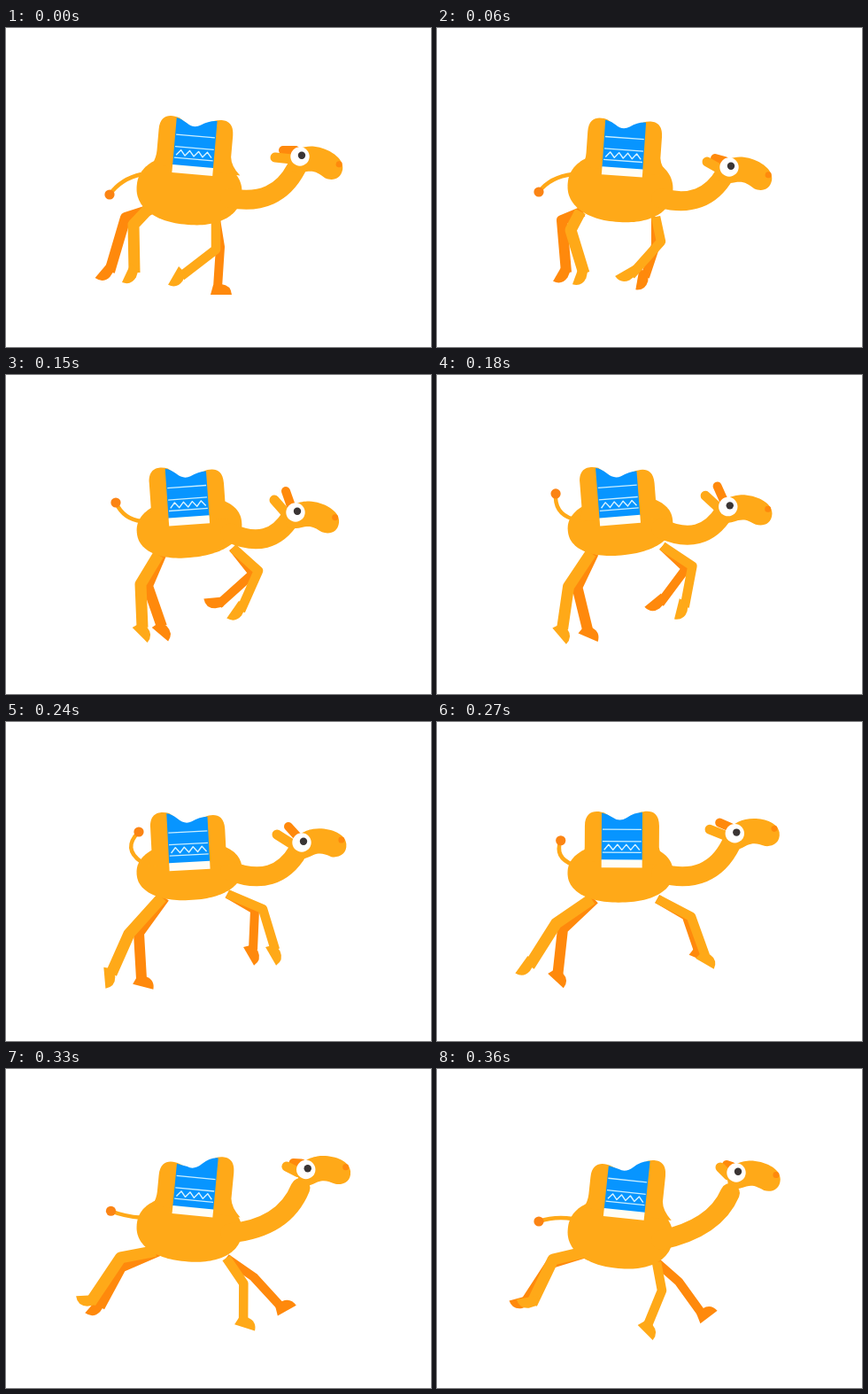
Animation of 480x360 px, one loop 420 ms. Source, as an HTML page with a canvas:

```html
<!DOCTYPE html>
<html>
<head>
<meta charset="utf-8">
<title>Running camel</title>
<style>
html, body { margin: 0; height: 100%; overflow: hidden; background: #fff; }
canvas { display: block; }
</style>
</head>
<body>
<canvas id="stage" width="480" height="360"></canvas>
<script>
const ctx = document.getElementById('stage').getContext('2d');
const LIGHT = '#ffa918', DARK = '#ff890c', BLUE = '#0795ff';
const LOOP = 420, STEP = 30, CYCLE = 390;
const KEYS = [0, 60, 90, 150, 240, 300, 360];

// Each track has one row per key time.
// Legs: knee x, y, ankle x, y, sole angle
const rearNear = [
  [144, 222, 145, 276, 115], [151, 228, 166, 277, 110], [151, 226, 186, 276, 90], [152, 236, 154, 285, 45],
  [139, 239, 119, 284, 85], [131, 215, 94, 266, 165], [131, 215, 107, 265, 170]];
const rearFar = [
  [135, 214, 117, 275, 130], [141, 217, 146, 276, 120], [152, 226, 181, 274, 105], [160, 238, 176, 284, 40],
  [150, 238, 153, 290, 15], [134, 228, 119, 275, 85], [129, 219, 99, 265, 165]];
const frontNear = [
  [237, 250, 198, 280, 120], [253, 241, 219, 279, 150], [269, 236, 240, 273, 165], [285, 221, 265, 266, 125],
  [290, 211, 304, 257, 60], [280, 232, 291, 274, 10], [254, 250, 238, 289, 45]];
const frontFar = [
  [242, 247, 239, 293, 0], [247, 245, 235, 281, 100], [260, 238, 226, 263, 200], [279, 224, 240, 259, 175],
  [281, 212, 279, 257, 60], [281, 229, 307, 262, -8], [273, 240, 299, 276, -37]];
// Rear hip, front hip
const hips = [
  [160, 205, 237, 216], [162, 207, 247, 213], [168, 206, 253, 207], [172, 203, 256, 195],
  [176, 198, 250, 194], [172, 203, 248, 207], [165, 207, 248, 218]];
// Center y, half height, tilt
const torso = [[183, 39, 5], [180, 39, 4], [177, 37, 1], [172, 34, -6], [168, 33, -3], [174, 35, 2], [186, 39, 6]];
// Hump center, tilt, slant of the top
const hump = [
  [213, 134, 5, 0], [211, 136, 4, 0], [209, 136.5, 1, 0], [205, 138, -4, -3],
  [206, 136, -3, -3], [212, 131.5, 4, 4], [214, 137.5, 6, 5]];
// Root y, bend, tip
const tail = [
  [165, 130, 170, 117, 188], [165, 128, 168, 115, 185], [166, 133, 166, 112, 176], [165, 133, 163, 124, 144],
  [158, 131, 143, 150, 124], [165, 134, 165, 125, 149], [169, 133, 166, 115, 172]];
// Root y, bend, end
const neck = [
  [192, 305, 202, 328, 158], [192, 302, 205, 325, 165], [192, 302, 212, 322, 172], [178, 298, 199, 322, 160],
  [168, 305, 188, 330, 145], [177, 312, 183, 333, 133], [193, 314, 180, 331, 140]];
// Eye, tilt
const head = [[332, 145, 10], [330, 157, 10], [329, 172, 12], [327, 155, 6], [334, 136, -5], [338, 117, -9], [338, 117, 2]];
// Near ear tip, far ear tip
const ears = [
  [304, 146, 313, 138], [305, 151, 314, 147], [309, 153, 319, 152], [303, 141, 316, 131],
  [306, 127, 319, 118], [311, 116, 320, 110], [320, 111, 327, 108]];

// Smooth periodic interpolation through the key poses
function sample(track, t) {
  const n = KEYS.length;
  const time = i => KEYS[(i + n) % n] + CYCLE * Math.floor(i / n);
  const row = i => track[(i + n) % n];
  let i = n - 1;
  while (KEYS[i] > t) i--;
  const span = time(i + 1) - time(i), u = (t - time(i)) / span;
  return row(i).map((a, c) => {
    const b = row(i + 1)[c];
    const slope = k => (row(k + 1)[c] - row(k - 1)[c]) / (time(k + 1) - time(k - 1)) * span;
    return a + (b - a) * u * u * (3 - 2 * u)
      + slope(i) * u * (1 - u) * (1 - u) - slope(i + 1) * u * u * (1 - u);
  });
}

function fill(path, color) {
  ctx.fillStyle = color;
  ctx.fill(new Path2D(path));
}

function stroke(path, color, width) {
  ctx.strokeStyle = color;
  ctx.lineWidth = width;
  ctx.stroke(new Path2D(path));
}

function dot(x, y, r, color) {
  ctx.fillStyle = color;
  ctx.beginPath();
  ctx.arc(x, y, r, 0, 2 * Math.PI);
  ctx.fill();
}

function place(x, y, degrees, draw) {
  ctx.save();
  ctx.translate(x, y);
  ctx.rotate(degrees * Math.PI / 180);
  draw();
  ctx.restore();
}

function drawLeg(track, t, hipX, hipY, color, width) {
  const [kx, ky, ax, ay, angle] = sample(track, t);
  stroke(`M${hipX},${hipY} L${kx},${ky} L${ax},${ay}`, color, width);
  place(ax, ay, angle, () => fill('M-5,-3 L-8,8 H16 Q15,-3 4,-4Z', color));
}

function drawTorso(t) {
  const [y, ry, tilt] = sample(torso, t), rx = 59.5;
  place(207, y, tilt, () => {
    ctx.beginPath();
    for (let a = 0; a < 2 * Math.PI; a += 0.05) {
      const soft = v => Math.sign(v) * Math.abs(v) ** 0.9;
      ctx.lineTo(rx * soft(Math.cos(a)), ry * soft(Math.sin(a)));
    }
    ctx.fillStyle = LIGHT;
    ctx.fill();
  });
}

function drawHump(t) {
  const [x, y, tilt, k] = sample(hump, t);
  const left = -31 + k, right = -31 - k;
  const top = `M-23,${left} Q-17,${left + 1} -11,${-26 + k / 2} Q-3,-20 5,${-25 - k / 2} Q14,${right} 23,${right}`;
  place(x, y, tilt, () => {
    fill(`M-46,24 Q-42,16 -42,8 V${left + 15} C-42,${left - 3} -29,${left - 3} -20,${left}
      L0,-18 L20,${right} C29,${right - 3} 42,${right - 3} 42,${right + 15} V8 Q43,18 54,28Z`, LIGHT);
    fill(top + ' V23 H-23Z', BLUE);
    fill('M-23,22 H23 V31 H-23Z', '#fffdf5');
    for (const lineY of [-12, 1.5, 14]) stroke(`M-22,${lineY} H22`, '#c9eeff', 1.3);
    let zigzag = 'M-20,11';
    for (let i = 1; i < 9; i++) zigzag += ` L${-20 + i * 5},${i % 2 ? 5 : 11}`;
    stroke(zigzag, '#d9f3ff', 1.4);
  });
}

function drawHead(t) {
  const [x, y, tilt] = sample(head, t);
  const [nx, ny, fx, fy] = sample(ears, t);
  stroke(`M${x - 5},${y - 7} L${fx},${fy}`, DARK, 10);
  stroke(`M${x - 9},${y + 3} L${nx},${ny}`, LIGHT, 11);
  place(x, y, tilt, () => {
    fill(`M-10,6 C-8,-9 4,-13 14,-14 C30,-15 50,-7 50,6 C50,18 40,21 32,19
      C24,15 20,13 12,15 Q0,20 -8,18Z`, LIGHT);
    dot(45, 1, 3.5, DARK);
  });
  dot(x, y, 10.7, '#fff');
  dot(x + 2, y - 1.2, 4.2, '#3a3534');
}

function drawTail(t) {
  const [rootY, bx, by, x, y] = sample(tail, t);
  stroke(`M153,${rootY} Q${bx},${by} ${x},${y}`, LIGHT, 4.5);
  dot(x, y, 5.6, '#fb8414');
}

function drawNeck(t) {
  const [rootY, bx, by, x, y] = sample(neck, t);
  stroke(`M253,${rootY} Q${bx},${by} ${x},${y}`, LIGHT, 22);
}

function draw(t) {
  ctx.fillStyle = '#fff';
  ctx.fillRect(0, 0, 480, 360);
  ctx.lineJoin = 'round';
  const [rx, ry, fx, fy] = sample(hips, t);
  drawLeg(rearFar, t, rx + 3, ry, DARK, 12);
  drawLeg(frontFar, t, fx, fy, DARK, 10);
  drawTail(t);
  drawLeg(rearNear, t, rx, ry, LIGHT, 13);
  drawLeg(frontNear, t, fx, fy, LIGHT, 10.5);
  drawTorso(t);
  ctx.lineCap = 'round';
  drawNeck(t);
  drawHead(t);
  ctx.lineCap = 'butt';
  drawHump(t);
}

// The last pose is held for two steps
function tick() {
  const step = Math.floor(performance.now() % LOOP / STEP);
  draw(Math.min(step, 12) * STEP);
  requestAnimationFrame(tick);
}
tick();
</script>
</body>
</html>
```
